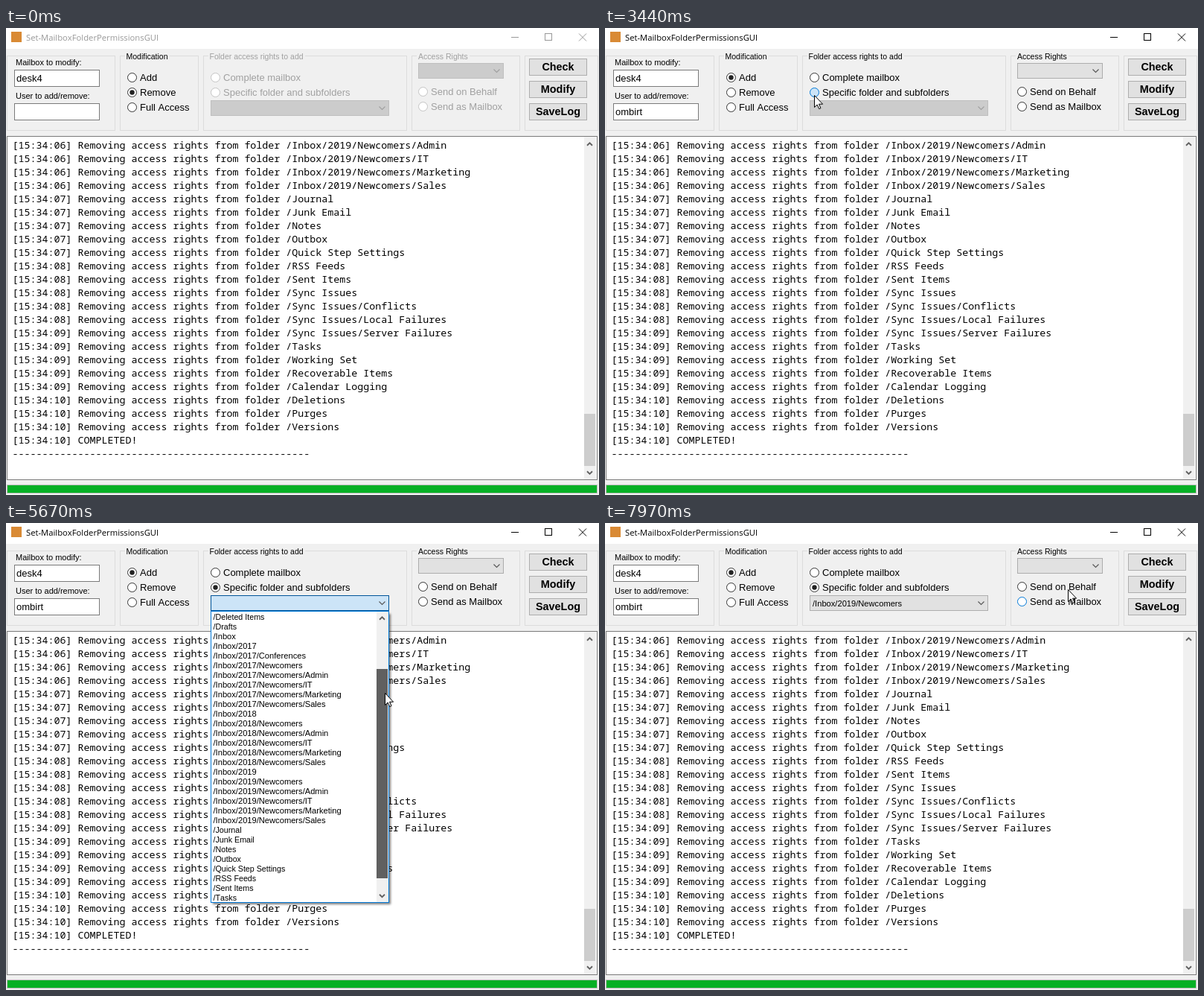
An HTML page that plays this animation: 797x627 px, repeating every 8 s.

```html
<!DOCTYPE html>
<html lang="en">
<head>
<meta charset="utf-8">
<title>Set-MailboxFolderPermissionsGUI</title>
<style>
  html, body { margin: 0; width: 100%; height: 100%; overflow: hidden; background: #f0f0f0; }
  svg { display: block; font-family: "Liberation Sans", Arial, sans-serif; font-kerning: none; }
  rect { shape-rendering: crispEdges; }
  .title { font-family: "Open Sans", "Noto Sans", sans-serif; }
  .log { font-family: "Noto Sans Mono", monospace; white-space: pre; }
  .bold { font-weight: bold; text-anchor: middle; }
  .shadow { filter: blur(1.5px); }
</style>
</head>
<body>
<svg id="stage" width="797" height="627" viewBox="0 0 797 627"><g id="back"></g><g id="live"></g></svg>
<script>
const LOOP = 8000;
const BLUE = '#0078d7', BORDER = '#7a7a7a', FADED = '#a0a0a0';
const MAILBOX = 'desk4', USER = 'ombirt';
const KEY_TIMES = [920, 1000, 1080, 1160, 1320, 1450];

// Moments at which the window changes state
const ACTIVE = 75, FOCUS = 690, ADD = 2610, SPECIFIC = 3520, OPEN = 4160, UNFOLDED = 4330,
      GRAB = 4850, RELEASE = 6000, CHOOSE = 6890;

// Pointer path: time, x, y
const PATH = [
  [100, 330, 640], [640, 75, 110], [900, 75, 110], [1500, 262, 128], [1700, 262, 42],
  [1880, 268, 24], [2100, 240, 50], [2420, 170, 64], [2680, 170, 64], [3250, 281, 90],
  [3520, 281, 90], [3950, 498, 110], [4390, 498, 110], [4600, 494, 152], [4780, 508, 168],
  [4950, 508, 168], [5130, 509, 185], [5200, 509, 185], [5850, 509, 245], [6020, 509, 245],
  [6480, 357, 303], [6610, 357, 303], [6750, 352, 318], [6950, 352, 318], [7400, 560, 215],
  [7660, 610, 150], [7940, 622, 89], [8000, 622, 89]
];

const teams = year => ['', '/Admin', '/IT', '/Marketing', '/Sales'].map(s => `/Inbox/${year}/Newcomers${s}`);
const FOLDERS = [
  '/Top of Information Store', '/Calendar', '/Contacts', '/Contacts/GAL Contacts',
  '/Contacts/Recipient Cache', '/Conversation Action Settings', '/Deleted Items', '/Drafts',
  '/Inbox', '/Inbox/2017', '/Inbox/2017/Conferences', ...teams(2017),
  '/Inbox/2018', ...teams(2018), '/Inbox/2019', ...teams(2019),
  '/Journal', '/Junk Email', '/Notes', '/Outbox', '/Quick Step Settings', '/RSS Feeds',
  '/Sent Items', '/Tasks', '/Working Set', '/Calendar Logging'
];
const REMOVED = [
  ...teams(2019).slice(1), '/Journal', '/Junk Email', '/Notes', '/Outbox', '/Quick Step Settings',
  '/RSS Feeds', '/Sent Items', '/Sync Issues', '/Sync Issues/Conflicts',
  '/Sync Issues/Local Failures', '/Sync Issues/Server Failures', '/Tasks', '/Working Set',
  '/Recoverable Items', '/Calendar Logging', '/Deletions', '/Purges', '/Versions'
];
const LOG = [...REMOVED.map(f => 'Removing access rights from folder ' + f), 'COMPLETED!']
  .map((line, i) => `[15:34:${String(6 + Math.floor((i + 1) / 5)).padStart(2, '0')}] ${line}`)
  .concat('-'.repeat(50));

const clamp = (v, lo, hi) => Math.max(lo, Math.min(hi, v));
const within = (p, x, y, w, h) => p.x >= x && p.x < x + w && p.y >= y && p.y < y + h;
const fill = (x, y, w, h, color) => `<rect x="${x}" y="${y}" width="${w}" height="${h}" fill="${color}"/>`;
const box = (x, y, w, h, color, stroke) =>
  `<rect x="${x + .5}" y="${y + .5}" width="${w - 1}" height="${h - 1}" fill="${color}" stroke="${stroke}"/>`;
const text = (x, y, str, size, color = '#000', cls = '') =>
  `<text x="${x}" y="${y}" font-size="${size}" fill="${color}" class="${cls}">${str}</text>`;
const line = (d, color, width = 1) => `<path d="${d}" fill="none" stroke="${color}" stroke-width="${width}"/>`;
const chevron = (x, y, dir, color, width, half) =>
  line(`M${x - half} ${y - dir * half / 2}l${half} ${dir * half}l${half} ${-dir * half}`, color, width);
const scrollArrow = (x, y, dir) => chevron(x, y, dir, '#606060', 1.8, 3.5);

const ruler = document.createElement('canvas').getContext('2d');
ruler.font = '13px "Liberation Sans", Arial, sans-serif';

function radio(x, y, label, { on = false, enabled = true, hover = false, pressed = false } = {}) {
  const ring = hover || pressed ? BLUE : enabled ? '#333' : '#c4c4c4';
  return `<circle cx="${x}" cy="${y}" r="6" fill="${pressed ? '#cce4f7' : '#fff'}" stroke="${ring}"/>` +
    (on ? `<circle cx="${x}" cy="${y}" r="3.2" fill="#222"/>` : '') +
    text(x + 10.5, y + 4.5, label, 13, enabled ? '#000' : FADED);
}

function combo(x, y, w, { enabled, hot, open, value = '' }) {
  const color = !enabled ? '#ccc' : open ? '#cce4f7' : hot ? '#e5f1fb' : '#e1e1e1';
  const stroke = !enabled ? '#bfbfbf' : open ? '#005499' : hot ? BLUE : '#adadad';
  return box(x, y, w, 21, color, stroke) + text(x + 4, y + 14.5, value, 11.15) +
    chevron(x + w - 9.5, y + 10.5, 1, enabled ? '#555' : '#a0a0a0', 1.1, 4);
}

function drawBack() {
  const groups = [[1, 146], [153, 106], [265, 274], [545, 146], [697, 99]];
  return fill(0, 0, 797, 627, '#f0f0f0') + fill(0, 0, 797, 28, '#fff') +
    fill(7, 5, 14, 14, '#d98a35') +
    groups.map(([x, w]) => box(x, 37, w, 101, 'none', '#dcdcdc')).join('') +
    text(13, 50, 'Mailbox to modify:', 11) + text(13, 95, 'User to add/remove:', 11) +
    box(11, 56, 115, 23, '#fff', BORDER) + text(14, 72, MAILBOX, 13) +
    fill(160, 32, 60, 12, '#f0f0f0') + text(161.5, 42, 'Modification', 10.5) +
    ['Check', 'Modify', 'SaveLog'].map((name, i) =>
      box(703, 41 + 30 * i, 78, 23, '#e1e1e1', '#adadad') +
      text(742, 57 + 30 * i, name, 14.4, '#000', 'bold')).join('') +
    fill(1, 145, 794, 462, '#fff') +
    LOG.map((row, i) => text(8.5, 162 + 18 * i, row, 13.333, '#000', 'log')).join('') +
    fill(777, 146, 16, 460, '#f0f0f0') + fill(777, 518, 15, 70, '#cdcdcd') +
    scrollArrow(784.5, 156, -1) + scrollArrow(784.5, 597, 1) +
    box(1, 613, 794, 12, '#06b025', '#bcbcbc');
}

function pointerAt(t) {
  const i = clamp(PATH.findIndex(k => k[0] > t), 1, PATH.length - 1);
  const [t0, x0, y0] = PATH[i - 1], [t1, x1, y1] = PATH[i];
  const u = clamp((t - t0) / (t1 - t0), 0, 1);
  return { x: x0 + (x1 - x0) * u, y: y0 + (y1 - y0) * u };
}

function drawPointer(p, beam) {
  const shape = beam
    ? line('M-3 -8.5h2.5q.5 0 .5 1v15q0 1 -.5 1h-2.5M3 -8.5h-2.5q-.5 0 -.5 1M0 7.5q0 1 .5 1h2.5', '#000')
    : '<path d="M.5 .5V16.5L4.2 13L6.8 18.6L9 17.6L6.5 12.2H11.6Z" fill="#fff" stroke="#000"/>';
  return `<g transform="translate(${Math.round(p.x)} ${Math.round(p.y)})">${shape}</g>`;
}

function drawList(t, p) {
  const thumb = t < GRAB ? 136 : t > 5850 ? 211 : clamp(136 + p.y - 168, 136, 211);
  const first = Math.round((thumb - 136) / 75 * 8);
  const inside = within(p, 276, 119, 221, 390);
  const marked = inside ? first + Math.floor((p.y - 119) / 13) : t > 4550 ? 2 : -1;
  const height = Math.round(clamp((t - OPEN) / (UNFOLDED - OPEN), 0, 1) * 392);
  const dragging = t >= GRAB && t < RELEASE;
  const thumbColor = dragging ? '#606060' : within(p, 498, thumb, 16, 281) ? '#a6a6a6' : '#cdcdcd';
  const rows = FOLDERS.slice(first, first + 30).map((name, i) => {
    const on = first + i === marked;
    return (on ? fill(276, 119 + 13 * i, 221, 13, BLUE) : '') +
      text(278.5, 130 + 13 * i, name, name.startsWith('/Inbox') ? 11.15 : 10.7, on ? '#fff' : '#000');
  }).join('');
  return (t > UNFOLDED ? '<rect x="278" y="122" width="239" height="390" fill="#000" opacity=".5" class="shadow"/>' : '') +
    `<svg x="275" y="118" width="240" height="${height}" viewBox="275 118 240 ${height || 1}">` +
    fill(275, 118, 240, 392, '#fff') + rows +
    fill(498, 119, 16, 390, '#f0f0f0') + fill(498, thumb, 15, 281, thumbColor) +
    scrollArrow(505.5, 128, -1) + scrollArrow(505.5, 500.5, 1) +
    box(275, 118, 240, 392, 'none', BLUE) + '</svg>';
}

function drawLive(t) {
  const p = pointerAt(t);
  const shown = t > 100 && !(t > 900 && t < 1500);
  const active = t >= ACTIVE, adding = t >= ADD, specific = t >= SPECIFIC;
  const open = t >= OPEN && t < CHOOSE, focused = t >= FOCUS && t < ADD;
  const chrome = active ? '#000' : '#999', groupInk = adding ? '#000' : FADED;
  const overLog = shown && !open && within(p, 1, 145, 794, 462);
  const overEdit = within(p, 11, 101, 115, 23);
  const typed = USER.slice(0, KEY_TIMES.filter(k => k <= t).length);
  const lit = t < 1740 || (t - 1740) % 1060 >= 530;
  const caret = Math.round(14 + ruler.measureText(typed).width);

  return text(27, 17, 'Set-MailboxFolderPermissionsGUI', 11.25, chrome, 'title') +
    line('M679 12.5h10', chrome) + box(724, 7, 10, 10, 'none', chrome) +
    line('M770 7.5l10 10M780 7.5l-10 10', chrome) +
    box(11, 101, 115, 23, '#fff', focused ? BLUE : shown && overEdit ? '#171717' : BORDER) +
    text(14, 117, typed, 13) + (focused && lit ? fill(caret, 104, 1, 16, '#000') : '') +
    radio(169.5, 66.5, 'Add', { on: adding, hover: shown && within(p, 163, 57, 90, 19) }) +
    radio(169.5, 86.5, 'Remove', { on: !adding, hover: shown && within(p, 163, 77, 90, 19) }) +
    radio(169.5, 106.5, 'Full Access') +
    fill(272, 32, 130, 12, '#f0f0f0') + text(273.5, 42, 'Folder access rights to add', 10.5, groupInk) +
    radio(281.5, 66.5, 'Complete mailbox', { enabled: adding }) +
    radio(281.5, 86.5, 'Specific folder and subfolders', {
      enabled: adding, on: specific, pressed: t > 3380 && !specific,
      hover: adding && !open && within(p, 275, 77, 190, 19) }) +
    combo(275, 97, 240, { enabled: specific, open, hot: within(p, 275, 97, 240, 21),
      value: t >= CHOOSE ? FOLDERS[23] : '' }) +
    fill(552, 32, 71, 12, '#f0f0f0') + text(554, 42, 'Access Rights', 10.55, groupInk) +
    combo(554, 47, 115, { enabled: adding }) +
    radio(560.5, 85.5, 'Send on Behalf', { enabled: adding }) +
    radio(560.5, 105.5, 'Send as Mailbox', { enabled: adding, hover: t > 7840 }) +
    box(1, 145, 794, 462, 'none', overLog ? '#171717' : BORDER) +
    (open ? drawList(t, p) : '') +
    (shown ? drawPointer(p, overEdit || (overLog && p.x < 777)) : '');
}

const live = document.getElementById('live');
document.getElementById('back').innerHTML = drawBack();
const start = performance.now();
function tick() {
  live.innerHTML = drawLive((performance.now() - start) % LOOP);
  requestAnimationFrame(tick);
}
tick();
</script>
</body>
</html>
```
